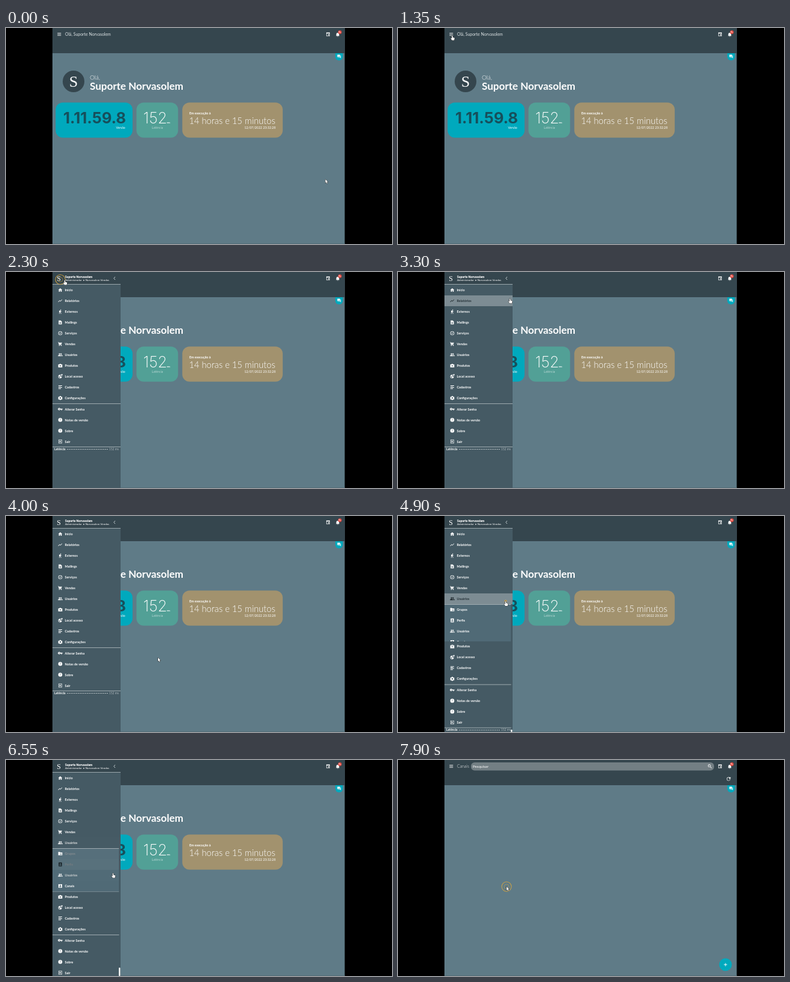
These frames come from a looping animation (640 by 360 pixels, 8 s). An HTML page with a canvas:

```html
<!DOCTYPE html>
<html lang="pt">
<head>
<meta charset="utf-8">
<style>
html, body { margin: 0; width: 100%; height: 100%; overflow: hidden; background: #000; }
canvas { display: block; }
</style>
</head>
<body>
<canvas width="640" height="360"></canvas>
<script>
const ctx = document.querySelector('canvas').getContext('2d');
const LOOP = 8000, USER = 'Suporte Norvasolem';
const TEAL = '#00a9bd', DARK = '#35464e';

// 24-unit icons, filled even-odd
const circle = (x, y, r) => `M${x - r} ${y}a${r} ${r} 0 1 0 ${2 * r} 0a${r} ${r} 0 1 0 ${-2 * r} 0z`;
const info = circle(12, 12, 10) + 'M11 6h2v7h-2zM11 15h2v2h-2z';
const people = circle(8, 8, 3.4) + circle(16, 8, 3.2) +
  'M1 19v-3c2-4 12-4 14 0v3zM17 19v-4l-1-2c3 0 6 1 7 3v3z';
const ICONS = Object.fromEntries(Object.entries({
  menu: 'M3 5h18v2.5H3zM3 11h18v2.5H3zM3 17h18v2.5H3z',
  home: 'M10 21v-7h4v7h5v-9h3L12 3 2 12h3v9z',
  chart: 'M3 19l6-7 4 4 9-10-2-1-7 8-4-4-8 8z',
  run: circle(14, 3.5, 2.3) + 'M6 8l6-2 3 4 4 1v2l-5-1-1 3 3 3v6h-2v-5l-4-3-2 7H6l3-13-1 4H6z',
  file: 'M4 2h10l6 6v14H4zM8 12h8v2H8zM8 16h8v2H8z',
  check: circle(12, 12, 10) + circle(12, 12, 7.6) + 'M7 12l2-1 2 2 5-5 1 2-6 6z',
  cart: circle(7, 20, 2) + circle(17, 20, 2) + 'M1 2h3l1 3h16l-5 9H8l-1 1h12v2H5V14L2 4H1z',
  people,
  bag: 'M2 6h6V3h8v3h6v15H2zM10 5h4v1h-4zM11 9h2v3h3v2h-3v3h-2v-3H8v-2h3z',
  globe: circle(11, 13, 9) + 'M5 10l5 5v5c-4-1-6-5-5-10zM14 6l-4 4 5 2 3 4 1-5zM17 1h6v6h-6z',
  list: 'M3 3h18v3H3zM3 8h12v2H3zM3 12h18v3H3zM3 18h12v3H3z',
  gear: 'M9 2h6l1 4 4-1 3 5-3 2 3 3-3 5-4-1-1 3H9l-1-3-4 1-3-5 3-3-3-2 3-5 4 1z' + circle(12, 12, 3.5),
  key: 'M12 10a6 6 0 1 0 0 4h4v4h4v-4h3v-4z' + circle(7, 12, 2),
  info,
  exit: 'M3 3h18v18H3zM5 5v14h14V5zM10 7l6 5-6 5v-4H6v-2h4z',
  folder: 'M2 4h8l2 2h10v14H2z' + circle(15, 11, 2) + 'M11 17c0-4 8-4 8 0z',
  card: 'M4 2h16v20H4z' + circle(12, 9, 3) + 'M7 18c0-6 10-6 10 0z',
  badge: 'M3 3h18v18H3z' + circle(12, 9, 3) + 'M6 18c0-6 12-6 12 0z',
  calendar: 'M3 3h18v18H3zM5 8v11h14V8zM12 12h5v5h-5z',
  bell: 'M5 17v-7a7 7 0 0 1 14 0v7l2 2H3zM9.5 20h5l-2.5 3z',
  chat: 'M2 2h15v11H6l-4 4zM19 6h3v16l-4-4H6v-3h13z',
  search: circle(9.5, 9.5, 7) + circle(9.5, 9.5, 4.6) + 'M14 16l2-2 6 6-2 2z',
  refresh: 'M12 4a8 8 0 1 0 8 9h-2a6 6 0 1 1-2-5l-3 3h8V3l-2.5 2.5q-3-2-6.500-1.500z',
  plus: 'M10.8 5h2.4v5.8H19v2.4h-5.8V19h-2.4v-5.8H5v-2.4h5.8z'
}).map(([name, d]) => [name, new Path2D(d)]));
const ARROW = new Path2D('M0 0v6.2l1.4-1.2 1 2.2 1.1-.5-1-2.1h1.9z');
const HAND = new Path2D('M-.8 .4q.8-1 1.5 0v2.6l2.6.7q.7.3.5 1.2l-.7 3h-3.6l-2-2.9q-.3-1 .6-.7l1.1.8z');

const MAIN = [['Início', 'home'], ['Relatórios', 'chart'], ['Externos', 'run'], ['Mailings', 'file'],
  ['Serviços', 'check'], ['Vendas', 'cart'], ['Usuários', 'people'], ['Produtos', 'bag'],
  ['Local acesso', 'globe'], ['Cadastros', 'list'], ['Configurações', 'gear'],
  ['Alterar Senha', 'key'], ['Notas de versão', 'info'], ['Sobre', 'info'], ['Sair', 'exit']];
const SUB = [['Grupos', 'folder'], ['Perfis', 'card'], ['Usuários', 'people'], ['Canais', 'badge']];

// Pointer path: time, x, y
const PATH = [[100, 529.5, 252], [300, 440, 195], [550, 200, 70], [850, 94, 14], [950, 94, 14],
  [1050, 92, 11], [1200, 92, 11], [1350, 90, 12.5], [2050, 90, 12.5], [2300, 97.5, 13.5],
  [2700, 98, 14], [2850, 120, 26], [3000, 160, 41], [3300, 185.5, 43.5], [3400, 206, 120],
  [3550, 236, 236], [3800, 226, 266], [4000, 252, 236], [4200, 252, 236], [4400, 178.5, 142],
  [6000, 178.5, 142], [6250, 178, 142], [6560, 177.5, 190], [6720, 180, 211]];
const CLICKS = [1980, 4850, 7620];

const clamp = v => Math.max(0, Math.min(1, v));
const easeOut = (t, start, length) => 1 - (1 - clamp((t - start) / length)) ** 3;

function pointer(t) {
  const i = PATH.findIndex(p => p[0] > t);
  if (i === 0) return PATH[0].slice(1);
  if (i < 0) return PATH.at(-1).slice(1);
  const [t0, x0, y0] = PATH[i - 1], [t1, x1, y1] = PATH[i], k = (t - t0) / (t1 - t0);
  return [x0 + (x1 - x0) * k, y0 + (y1 - y0) * k];
}

// Share of the last `span` ms that the pointer spent on a row
function hover(t, y, span) {
  let hits = 0;
  for (let i = 0; i < 20; i++) {
    const [px, py] = pointer(t - span * i / 20);
    if (px < 190 && py >= y - 9 && py < y + 9) hits++;
  }
  return hits / 20;
}

function text(s, x, y, size, { weight = 400, color = '#fff', align = 'left', font = 'Lato, sans-serif' } = {}) {
  ctx.font = `${weight} ${size}px ${font}`;
  ctx.fillStyle = color;
  ctx.textAlign = align;
  ctx.fillText(s, x, y);
}
function rect(x, y, w, h, color, radius = 0) {
  ctx.fillStyle = color;
  ctx.beginPath();
  ctx.roundRect(x, y, w, h, radius);
  ctx.fill();
}
const dot = (x, y, r, color) => rect(x - r, y - r, 2 * r, 2 * r, color, r);
function icon(name, x, y, size = 8, color = '#fff') {
  ctx.save();
  ctx.translate(x - size / 2, y - size / 2);
  ctx.scale(size / 24, size / 24);
  ctx.fillStyle = color;
  ctx.fill(ICONS[name], 'evenodd');
  ctx.restore();
}
const initial = (x, y, size) => text('S', x, y, size, { align: 'center', font: '"Liberation Serif", serif' });

function home() {
  text('Olá, ' + USER, 98, 13, 6.9, { weight: 400, color: '#dfe4e6' });
  dot(112, 89, 18, DARK);
  initial(112, 97.5, 26);
  text('Olá,', 139, 86, 10, { weight: 300 });
  text(USER, 139, 102.5, 17, { weight: 700 });

  const digits = 'Inter, sans-serif', right = { align: 'right' };
  rect(82.3, 124.3, 127.5, 58.5, TEAL, 12);
  text('1.11.59.8', 95, 159, 25.6, { weight: 700, color: '#164f5b', font: digits });
  text('Versão', 197.5, 168, 5, right);
  rect(216.3, 124.3, 69, 58.5, '#52a096', 12);
  text('152', 227.5, 159, 25.4, { weight: 200, font: digits });
  text('ms', 266.5, 159, 4.5, { weight: 700 });
  text('Latência', 251, 168, 5.2, { weight: 300, align: 'center' });
  rect(292.3, 124.3, 166.5, 58.5, '#a2926e', 12);
  text('Em execução à', 304, 144, 5.4, { weight: 700 });
  text('14 horas e 15 minutos', 303.5, 159.5, 14.7, { weight: 300 });
  text('12/07/2022 23:32:28', 447, 167.5, 5.3, right);
}

function channels(t) {
  text('Canais', 98, 13, 7, { weight: 300 });
  rect(121, 4, 403, 13.5, '#737f84', 6);
  text('Pesquisar', 124, 12.5, 6.2);
  icon('search', 517, 10.5);
  icon('refresh', 548, 31.5, 9);
  const k = easeOut(t, 7700, 180);
  dot(543, 341, 10.5 * k, TEAL);
  icon('plus', 543, 341, 9 * k);
}

function row(t, [label, name], y, hoverable, width) {
  const h = hoverable ? hover(t, y, 300) : 0;
  if (h) rect(77, y - 9, width, 18, `rgba(255,255,255,${0.3 * h * h})`);
  const k = clamp(h * 1.6), mix = (a, b) => Math.round(a + (b - a) * k);
  const dark = hoverable && hover(t, y, 120) > 0.5;
  icon(name, 90, y, 8, dark ? '#172125' : '#fff');
  text(label, 97.5, y + 2, 5.4, { weight: 700, color: `rgb(${mix(255, 38)},${mix(255, 50)},${mix(255, 56)})` });
}

function drawer(t) {
  const open = easeOut(t, 1960, 300) - easeOut(t, 7650, 220);
  if (open <= 0) return;
  const grow = 72 * easeOut(t, 4750, 320), width = grow ? 110.5 : 113;
  const line = y => rect(77, y, width, 1, '#9fabb0');
  const settled = t > 2300;
  ctx.save();
  ctx.translate(-114 * (1 - open), 0);
  rect(77, 0, 113, 360, '#455a64');
  rect(77, 0, 113, 20, DARK);
  initial(87.5, 14.5, 12);
  text(USER, 98, 9.5, 4.9, { weight: 900 });
  text('Administrador  ▸ Norvasolem Vendas', 98, 14.5, 4.5);
  ctx.strokeStyle = '#cfd8dc';
  ctx.lineWidth = 0.9;
  ctx.beginPath();
  ctx.moveTo(181, 8);
  ctx.lineTo(178.8, 10.5);
  ctx.lineTo(181, 13);
  ctx.stroke();
  rect(77, 20, 113, 1, '#9aa7ac');

  MAIN.forEach((item, i) => {
    const y = 30 + 18 * i + (i > 6 ? grow : 0) + (i > 10 ? 0.5 : 0);
    row(t, item, y, settled && (i < 7 || !grow), i < 7 ? 113 : width);
  });
  line(219 + grow);
  line(291 + grow);
  text('Latência', 80, 297 + grow, 5, { weight: 700 });
  text('152 ms', 187, 297 + grow, 5, { weight: 300, align: 'right' });
  for (let x = 101; x < 169; x += 3) rect(x, 295 + grow, 2, 0.8, '#dbe1e3');

  if (grow) {
    ctx.save();
    ctx.beginPath();
    ctx.rect(77, 147, width, grow + 0.5);
    ctx.clip();
    rect(77, 147, width, 73, '#506a76');
    SUB.forEach((item, i) => row(t, item, 156 + 18 * i, true, width));
    line(147);
    line(219);
    ctx.restore();
    const thumb = Math.max(0, (grow - 57) * 0.93);
    rect(187, 360 - thumb, 2.5, thumb, '#f2f4f4', 1);
  }
  ctx.restore();
}

function ripple(t) {
  for (const start of CLICKS) {
    const age = t - start;
    if (age < 0 || age > 480) continue;
    const [x, y] = pointer(start), r = 8 * Math.min(1, age / 250);
    ctx.globalAlpha = clamp((480 - age) / 130) * 0.85;
    ctx.strokeStyle = '#d6a53f';
    ctx.lineWidth = 1.1;
    for (const radius of [r, r / 2]) {
      ctx.beginPath();
      ctx.arc(x, y, radius, 0, 7);
      ctx.stroke();
      ctx.lineWidth = 0.6;
    }
    ctx.globalAlpha = 1;
  }
}

function cursor(t) {
  const [x, y] = pointer(t);
  const overMenu = t > 1960 && t < 7750 && x < 190, overButton = t < 1960 && x < 95 && y < 20;
  const shape = overMenu || overButton ? HAND : ARROW;
  ctx.save();
  ctx.translate(x, y);
  ctx.strokeStyle = '#111';
  ctx.lineWidth = 0.9;
  ctx.stroke(shape);
  ctx.fillStyle = '#fff';
  ctx.fill(shape);
  ctx.restore();
}

function draw(t) {
  rect(0, 0, 640, 360, '#000');
  ctx.save();
  ctx.beginPath();
  ctx.rect(77, 0, 484.6, 360);
  ctx.clip();
  rect(77, 0, 485, 360, '#5f7b87');
  rect(77, 359, 485, 1, '#526b76');
  rect(77, 0, 485, 42, DARK);
  icon('menu', 88.3, 10.5);
  t < 7700 ? home() : channels(t);
  icon('calendar', 534, 10.5);
  icon('bell', 550, 11);
  dot(553.5, 7, 3, '#e5483f');
  text('9+', 553.5, 8.3, 3.5, { weight: 700, align: 'center' });
  rect(546, 42, 12.5, 12, TEAL, [0, 0, 6, 6]);
  icon('chat', 552.3, 47.5, 7);
  drawer(t);
  ripple(t);
  cursor(t);
  ctx.restore();
}

function frame() {
  draw(performance.now() % LOOP);
  requestAnimationFrame(frame);
}
frame();
</script>
</body>
</html>
```
